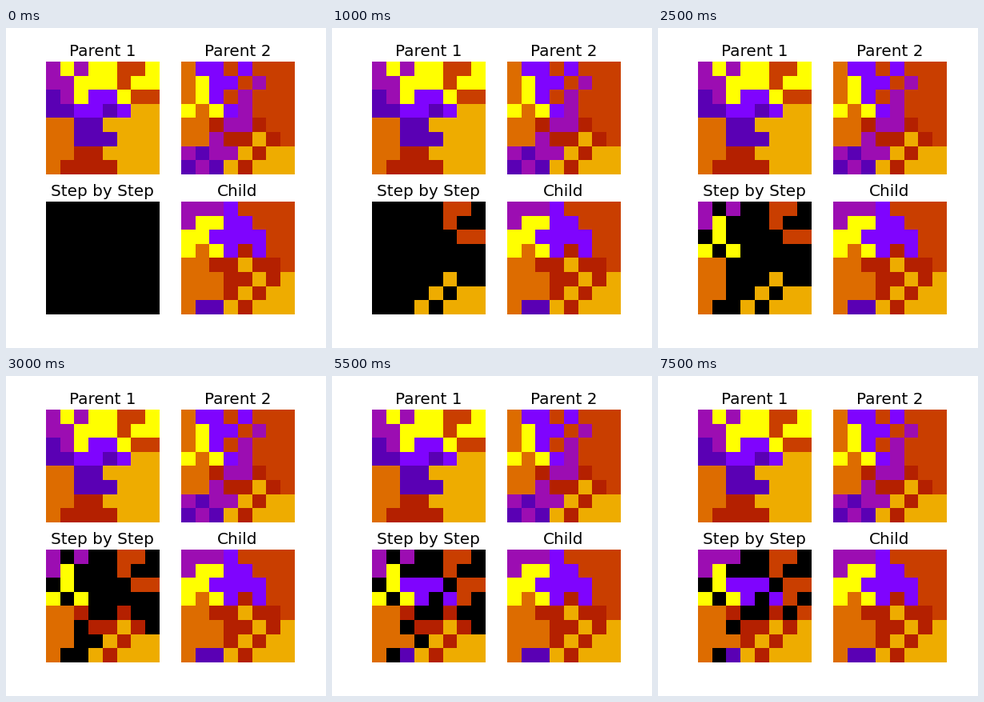
A matplotlib script that plays this animation: 400 px wide and 400 px high, repeating every 8 s.

```python
import numpy as np
import matplotlib.pyplot as plt
from matplotlib.animation import FuncAnimation

SIZE = 400
W, H = 142, 141


def grid(rows):
    return np.array([[int(c) for c in row] for row in rows.split()])


parent1 = grid("38388558 33888588 13822855 11221277 "
               "66117777 66111777 66447777 64444777")
parent2 = grid("62252555 68225355 68253555 86823555 "
               "66433455 66344745 31337477 13174777")
child = grid("33325555 38822555 88222255 86824255 "
             "66447445 66644747 66647477 61174777")

# Parents take turns handing over one colour region each
REGIONS = [5, 7, 6, 8, 3, 4, 2, 1]
# Remaining gaps are then filled one cell at a time
GAPS = [(3, 6), (6, 2), (2, 2), (0, 1), (6, 3), (5, 7), (4, 7)]


def build_steps():
    state = np.zeros((8, 8), int)
    steps = [state.copy()]
    for i, value in enumerate(REGIONS):
        parent = (parent1, parent2)[i % 2]
        state[(state == 0) & (parent == value)] = value
        steps.append(state.copy())
    for cell in GAPS:
        state[cell] = child[cell]
        steps.append(state.copy())
    return steps


fig = plt.figure(figsize=(4, 4), dpi=100, facecolor="white")


def panel(title, data, left, top):
    ax = fig.add_axes([left / SIZE, 1 - (top + H) / SIZE, W / SIZE, H / SIZE])
    ax.axis("off")
    fig.text((left + 70.45) / SIZE, 1 - (top - 6.7) / SIZE, title,
             ha="center", va="baseline", fontsize=14.4, family="DejaVu Sans")
    return ax.imshow(data, cmap="gnuplot", vmin=0, vmax=8,
                     interpolation="nearest", aspect="auto")


steps = build_steps()
panel("Parent 1", parent1, 50, 42)
panel("Parent 2", parent2, 219, 42)
image = panel("Step by Step", steps[0], 50, 217)
panel("Child", child, 219, 217)


def update(i):
    image.set_data(steps[i])
    return [image]


anim = FuncAnimation(fig, update, frames=len(steps), interval=500,
                     repeat=True, repeat_delay=0)
plt.show()
```
